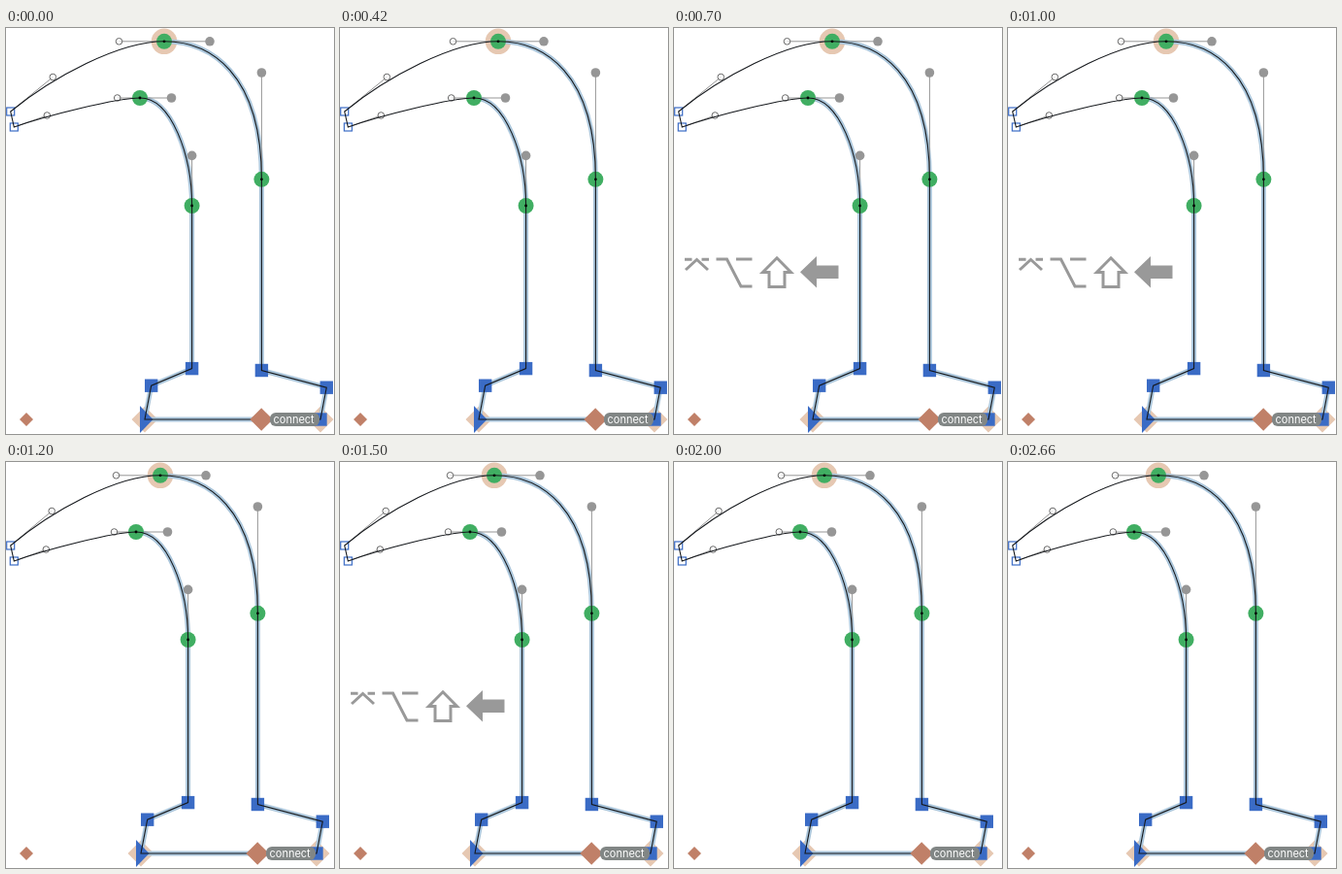
Write an HTML page that moves like this. It is 338 by 418 pixels and loops after 3100 ms.

```html
<!DOCTYPE html>
<html lang="en">
<head>
<meta charset="utf-8">
<title>Nudging selected nodes</title>
<style>
  html, body { margin: 0; width: 100%; height: 100%; overflow: hidden; background: #fff; }
  svg { display: block; width: 338px; height: 418px; }
  .pose, #keys { opacity: 0; animation: 3100ms step-end infinite; }
  #pose0 { animation-name: first; }
  #pose1 { animation-name: second; }
  #pose2 { animation-name: third; }
  #keys { animation-name: press; }
  /* nudges at 1200 and 2000 ms, keys shown 700-1200 and 1500-2000 ms */
  @keyframes first { 0% { opacity: 1 } 38.7097%, 100% { opacity: 0 } }
  @keyframes second { 0% { opacity: 0 } 38.7097% { opacity: 1 } 64.5161%, 100% { opacity: 0 } }
  @keyframes third { 0% { opacity: 0 } 64.5161%, 100% { opacity: 1 } }
  @keyframes press {
    0% { opacity: 0 } 22.5806% { opacity: 1 } 38.7097% { opacity: 0 }
    48.3871% { opacity: 1 } 64.5161%, 100% { opacity: 0 }
  }
  .glow { fill: none; stroke: #abc6db; stroke-width: 5; stroke-linejoin: round; }
  .line { fill: none; stroke: #15181c; stroke-width: 1.1; }
  .arm { stroke: #969696; stroke-width: 1; }
  .grip { fill: #969696; }
  .ring { fill: #fff; fill-opacity: .6; stroke: #666; stroke-width: 1; }
  .halo { fill: #e6c8b2; }
  .smooth { fill: #40ae62; }
  .corner { fill: #3a6bc5; }
  .open { fill: #fff; stroke: #3a6bc5; stroke-width: 1.2; }
  .anchor { fill: #c08068; }
  .pill { fill: #818685; }
  .label { fill: #fff; font: 11px Inter, "Open Sans", sans-serif; }
  .key { fill: none; stroke: #999; stroke-width: 3; }
</style>
</head>
<body>
<svg id="stage" viewBox="0 0 338 418">
  <g id="poses"></g>
  <path class="anchor" d="M21 396l7 7l-7 7l-7-7z"/>
  <g id="keys">
    <path class="key" d="M11 238.2H18.5M28.5 238.2H36M12 249L23.5 238.5L35 249"/>
    <path class="key" d="M43.5 238H54.5L69 266H80.5M64 238H80.5"/>
    <path class="key" stroke-linejoin="miter" d="M106 236.8L120.5 251.5H114V266.5H98V251.5H91.5Z"/>
    <path fill="#999" d="M130 251.2L147 235V244.5H169.5V258H147V267.5Z"/>
  </g>
</svg>
<script>
  const STEP = -4;

  const diamond = (cls, [x, y], r) =>
    `<path class="${cls}" d="M${x} ${y - r}l${r} ${r}l${-r} ${r}l${-r} ${-r}z"/>`;
  const dot = (cls, [x, y], r) => `<circle class="${cls}" cx="${x}" cy="${y}" r="${r}"/>`;
  const box = (cls, [x, y], r) =>
    `<rect class="${cls}" x="${x - r}" y="${y - r}" width="${2 * r}" height="${2 * r}"/>`;
  const arm = ([x, y], [u, v]) => `<path class="arm" d="M${x} ${y}L${u} ${v}"/>`;

  function drawPose(step) {
    const dx = step * STEP;
    // share: how much of the nudge a point follows
    const at = (x, y, share = 1) => [x + dx * share, y];

    const tipTop = at(4.7, 86, 0), tipLow = at(8.3, 102, 0);
    const crown = at(163, 13.8), throat = at(138, 72);
    const back = at(263.4, 155.8), front = at(191.6, 183);
    const heelTop = at(263.4, 352.5), heel = at(330.3, 370.2), heelLow = at(324, 403);
    const start = at(143, 403), toe = at(149.7, 368.2), toeTop = at(191.6, 350.6);

    const crownOut = at(210, 13.8), backIn = at(263.4, 46);
    const frontOut = at(191.6, 131.4), throatIn = at(170.5, 72);
    const crownIn = at(116.5, 13.8, 0.75), tipOut = at(48.3, 50.5, 0.28);
    const throatOut = at(114.7, 72, 0.8), tipIn = at(42.3, 90, 0.25);

    const body = `M${crown}C${crownOut} ${backIn} ${back}` +
      `L${heelTop} ${heel} ${heelLow} ${start} ${toe} ${toeTop} ${front}` +
      `C${frontOut} ${throatIn} ${throat}`;
    const beak = `M${throat}C${throatOut} ${tipIn} ${tipLow}L${tipTop}` +
      `C${tipOut} ${crownIn} ${crown}`;

    const arms = [
      [crown, crownIn], [crown, crownOut], [back, backIn], [front, frontOut],
      [throat, throatIn], [throat, throatOut], [tipTop, tipOut], [tipLow, tipIn]
    ];
    const [sx, sy] = start;
    const middle = at(263.2, 403);

    return `<g class="pose" id="pose${step}">` +
      dot('halo', crown, 13.3) +
      diamond('halo', start, 13.5) + diamond('halo', heelLow, 13.5) +
      `<path class="glow" d="${body}"/>` +
      arms.map(a => arm(...a)).join('') +
      [crownOut, backIn, frontOut, throatIn].map(p => dot('grip', p, 4.8)).join('') +
      [crownIn, tipOut, throatOut, tipIn].map(p => dot('ring', p, 3.3)).join('') +
      [crown, throat, back, front].map(p => dot('smooth', p, 8)).join('') +
      [heelTop, heel, heelLow, toe, toeTop].map(p => box('corner', p, 6.7)).join('') +
      `<path class="corner" d="M${sx - 5} ${sy - 14}V${sy + 14}L${sx + 8.5} ${sy}z"/>` +
      [tipTop, tipLow].map(p => box('open', p, 4)).join('') +
      `<path class="line" d="${body}"/><path class="line" d="${beak}"/>` +
      [crown, throat, back, front].map(p => dot('dot', p, 1.4)).join('') +
      diamond('anchor', middle, 11.8) +
      `<rect class="pill" x="${272 + dx}" y="396" width="51" height="14" rx="6"/>` +
      `<text class="label" x="${275.5 + dx}" y="407">connect</text></g>`;
  }

  document.getElementById('poses').innerHTML = [0, 1, 2].map(drawPose).join('');
</script>
</body>
</html>
```
